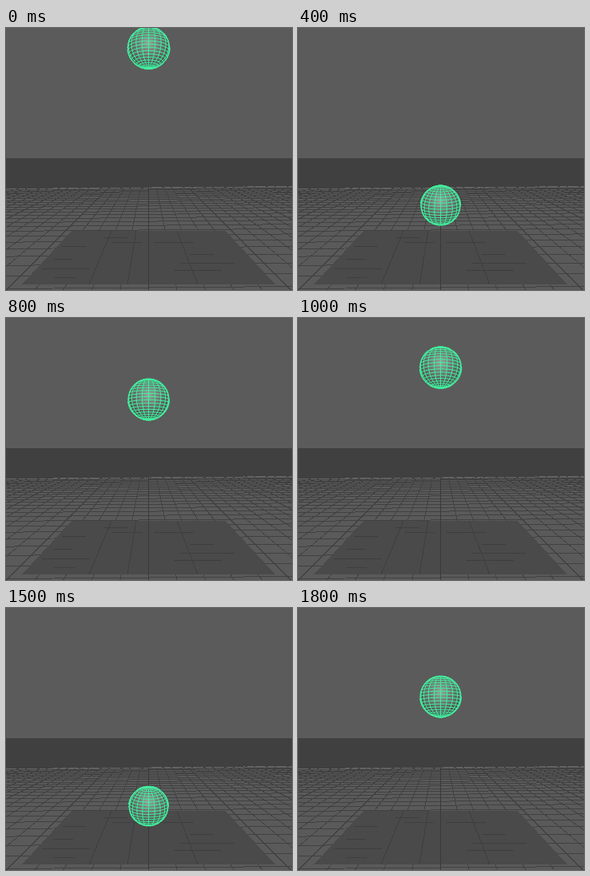
Write an HTML page that moves like this. It is 358x328 px and loops after 1.9 s.

```html
<!DOCTYPE html>
<html lang="en">
<head>
<meta charset="utf-8">
<title>Bouncing ball</title>
<style>
  html, body { margin: 0; width: 100%; height: 100%; overflow: hidden; background: #5b5b5b; }
  svg { display: block; }
  path { fill: none; stroke-width: 1; }
</style>
</head>
<body>
<svg width="358" height="328" viewBox="0 0 358 328">
  <defs>
    <radialGradient id="shade" cx=".5" cy=".38" r=".62">
      <stop offset="0" stop-color="#93a89d"/>
      <stop offset=".4" stop-color="#707a75"/>
      <stop offset="1" stop-color="#424745"/>
    </radialGradient>
  </defs>
  <rect width="358" height="163" fill="#5b5b5b"/>
  <rect y="163" width="358" height="38" fill="#404040"/>
  <g shape-rendering="crispEdges">
    <path d="M0 201L358 198V328H0Z" style="fill:#5a5a5a"/>
    <path id="grid" stroke="#414141"/>
    <path d="M0 201.5L358 198.5" stroke="#6a6a6a" stroke-dasharray="13 3 8 2"/>
    <path d="M82 254H275L337 321H20Z" style="fill:#4a4a4a"/>
    <path id="seams" stroke="#3e3e3e"/>
    <path d="M178.5 199V328" stroke="#393939"/>
  </g>
  <g id="ball">
    <circle id="body" fill="url(#shade)" stroke="#43f0a0" stroke-width="1.3"/>
    <path id="wire" stroke="#43f0a0"/>
  </g>
</svg>
<script>
const $ = id => document.getElementById(id);
const CX = 178.5, HORIZON = 150, FOCAL = 350, UNIT = 0.2;
const STEP = 100;
// Height of the ball's centre at each step
const path = [25, 43, 95, 160, 222, 254, 206, 167, 102, 52,
              62, 107, 167, 223, 253, 248, 212, 163, 111];

function drawFloor() {
  let d = '';
  for (let i = -19; i <= 19; i++) {
    const at = y => `${(CX + i * UNIT * (y - HORIZON)).toFixed(1)} ${y}`;
    d += `M${at(200)}L${at(328)}`;
  }
  // Rows are evenly spaced in depth
  const far = FOCAL / 50;
  for (let i = 0, z = far; z > 1.8; z = far - ++i * UNIT) {
    const y = HORIZON + FOCAL / z;
    d += `M0 ${(y + 1.5).toFixed(1)}L358 ${(y - 1.5).toFixed(1)}`;
  }
  $('grid').setAttribute('d', d);

  const dashes = [[70, 273, 30], [60, 289, 24], [45, 301, 60], [133, 268, 38], [185, 268, 50],
                  [122, 262, 30], [218, 294, 68], [210, 303, 60], [230, 283, 30], [60, 312, 26]];
  $('seams').setAttribute('d', 'M163 254L152 321M214 254L240 321M132 254L104 321' +
    dashes.map(([x, y, w]) => `M${x} ${y}.5h${w}`).join(''));
}

function curve(point) {
  let d = '', pen = false;
  for (let i = 0; i <= 36; i++) {
    const [x, y, z] = point(i / 36);
    if (z >= 0) d += `${pen ? 'L' : 'M'}${x.toFixed(2)} ${y.toFixed(2)}`;
    pen = z >= 0;
  }
  return d;
}

function drawBall(cy) {
  const r = 26.6 - (cy - 25) * 0.0075;
  const tilt = Math.atan((HORIZON - cy) / FOCAL);
  const s = Math.sin(tilt), c = Math.cos(tilt);
  const spot = (lat, lon) => {
    const h = Math.sin(lat), q = Math.cos(lat) * Math.cos(lon);
    return [CX + r * Math.cos(lat) * Math.sin(lon), cy - r * (h * c + q * s), q * c - h * s];
  };
  const seg = Math.PI / 20;
  let d = '';
  for (let i = -9; i <= 9; i++) d += curve(t => spot(i * seg, (t - 0.5) * 2 * Math.PI));
  for (let i = 0; i < 20; i++) d += curve(t => spot((t - 0.5) * Math.PI, i * 2 * seg));
  $('wire').setAttribute('d', d);
  const body = $('body');
  body.setAttribute('cx', CX);
  body.setAttribute('cy', cy);
  body.setAttribute('r', r - 0.6);
}

let shown = -1;
function tick() {
  const i = Math.floor(performance.now() / STEP) % path.length;
  if (i !== shown) drawBall(path[shown = i]);
  requestAnimationFrame(tick);
}

drawFloor();
tick();
</script>
</body>
</html>
```
